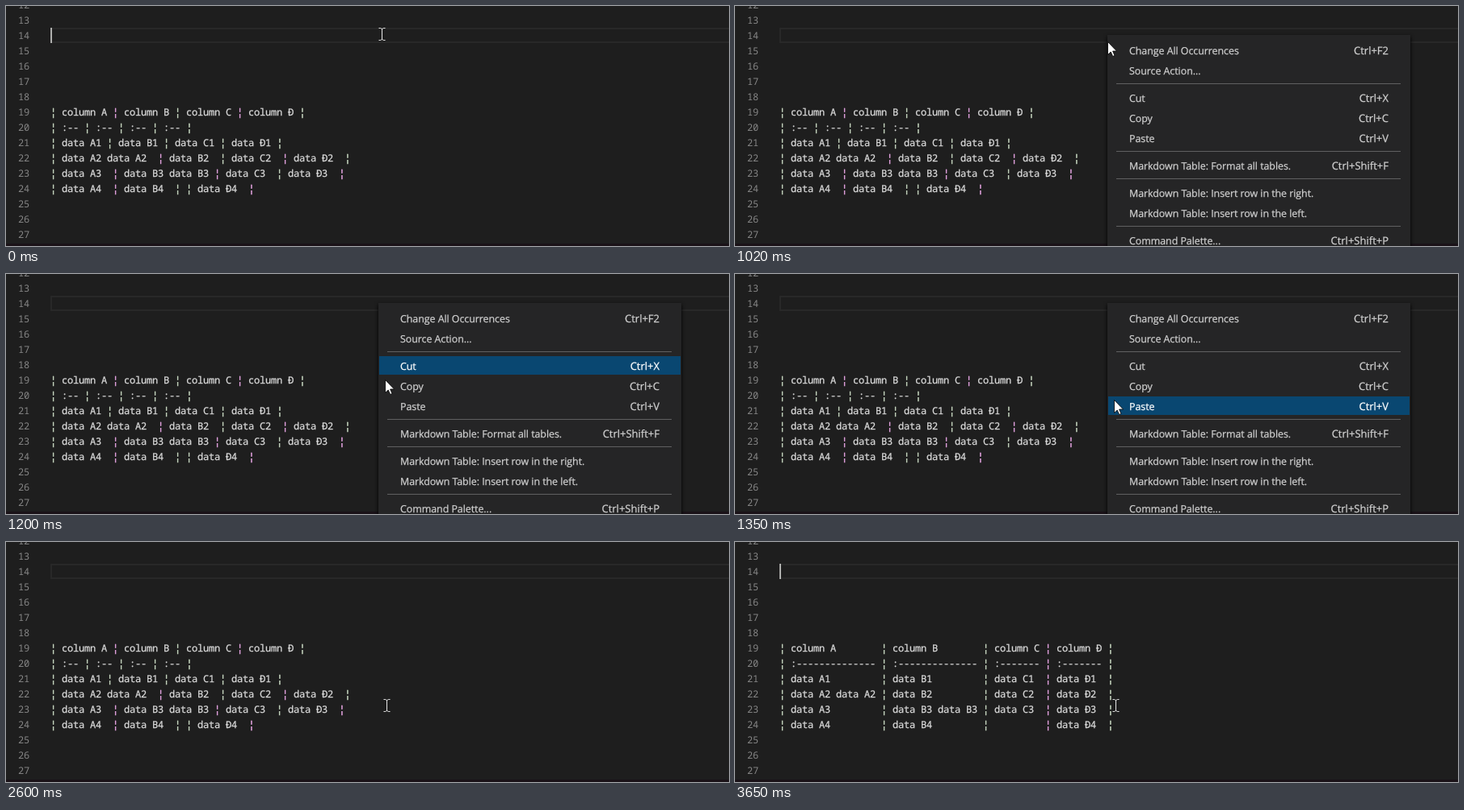
Write an HTML page that moves like this. It is 895 px wide and 298 px high and loops after 4.03 s.

```html
<!DOCTYPE html>
<html lang="en">
<head>
<meta charset="utf-8">
<title>Format tables from the context menu</title>
<style>
  html, body { margin: 0; width: 100%; height: 100%; overflow: hidden; background: #1e1e1e; }
  svg { display: block; width: 895px; height: 298px; }
  text { white-space: pre; text-rendering: geometricPrecision; stroke-width: .25px; }
  .code { font: 12px "Noto Sans Mono", monospace; letter-spacing: -.2px; fill: #dcdcdc; stroke: #dcdcdc; }
  .num { fill: #858585; stroke: none; }
  .even, .odd { stroke-width: .5px; }
  .even { fill: #cfe0c8; stroke: #cfe0c8; }
  .odd { fill: #eeaaea; stroke: #eeaaea; }
  #menu { filter: drop-shadow(0 2px 2.5px #000); }
  .item text { font: 12.4px "Open Sans", sans-serif; letter-spacing: -.03px; fill: #d0d0d0; stroke: #d0d0d0; }
  .item .key { font-size: 13px; letter-spacing: 0; text-anchor: end; }
  .item rect { fill: none; }
  .item.on rect { fill: #094771; }
  .item.on text { fill: #fff; stroke: #fff; }
</style>
</head>
<body>
<svg id="stage" viewBox="0 0 895 298">
  <rect width="895" height="298" fill="#1e1e1e"/>
  <path d="M897 28H56V45H897" fill="none" stroke="#282828" stroke-width="2"/>
  <g id="numbers"></g>
  <g id="messy"></g>
  <g id="tidy"></g>
  <rect id="caret" x="55" y="27" width="2" height="19" fill="#aeafad"/>
  <rect y="295" width="895" height="3" fill="#1a1218"/>
  <g id="menu"><rect x="461" y="36" width="375" height="290" fill="#252526"/></g>
  <path id="beam" d="M-3.5 -7.5H-1.5L.5 -6.5 2.5 -7.5H4.5M.5 -6.5V6.5M-3.5 7.5H-1.5L.5 6.5 2.5 7.5H4.5" fill="none" stroke="#e8e8e8"/>
  <path id="arrow" d="M.5 .5V16.5L4.2 13 6.7 18.5 9 17.5 6.6 12H11.5Z" fill="#fff" stroke="#000" stroke-width=".8"/>
</svg>
<script>
const LOOP = 4030;
const $ = id => document.getElementById(id);

function add(parent, tag, attrs, text) {
  const node = document.createElementNS('http://www.w3.org/2000/svg', tag);
  for (const key in attrs) node.setAttribute(key, attrs[key]);
  if (text) node.textContent = text;
  return parent.appendChild(node);
}

const baseline = line => 41 + (line - 14) * 19;

// Line numbers
for (let n = 12; n <= 27; n++)
  add($('numbers'), 'text', { x: 15, y: baseline(n), class: 'code num' }, String(n));

// Table, as typed and formatted
const rows = [
  '¦ column A ¦ column B ¦ column C ¦ column Đ ¦',
  '¦ :-- ¦ :-- ¦ :-- ¦ :-- ¦',
  '¦ data A1 ¦ data B1 ¦ data C1 ¦ data Đ1 ¦',
  '¦ data A2 data A2  ¦ data B2  ¦ data C2  ¦ data Đ2  ¦',
  '¦ data A3  ¦ data B3 data B3 ¦ data C3  ¦ data Đ3  ¦',
  '¦ data A4  ¦ data B4  ¦ ¦ data Đ4  ¦'
];

function format(lines) {
  const cells = lines.map(line => line.split('¦').slice(1, -1).map(cell => cell.trim()));
  const widths = cells[0].map((_, i) => Math.max(...cells.map(row => row[i].length)));
  return cells.map(row => '¦ ' + row.map((cell, i) =>
    cell.padEnd(widths[i], cell[0] === ':' ? '-' : ' ')).join(' ¦ ') + ' ¦');
}

function drawTable(parent, lines) {
  lines.forEach((line, i) => {
    const text = add(parent, 'text', { x: 55, y: baseline(19 + i), class: 'code' });
    let col = 0;
    for (const part of line.split(/(¦)/)) {
      if (!part) continue;
      const cls = part === '¦' ? (col % 2 ? 'odd' : 'even') : 'cell';
      add(text, 'tspan', { class: cls }, part);
      col += part.length;
    }
  });
}
drawTable($('messy'), rows);
drawTable($('tidy'), format(rows));

// Context menu: top edge, label, shortcut
const items = [
  [43, 'Change All Occurrences', 'Ctrl+F2'],
  [68, 'Source Action...'],
  [102, 'Cut', 'Ctrl+X'],
  [127, 'Copy', 'Ctrl+C'],
  [152, 'Paste', 'Ctrl+V'],
  [186, 'Markdown Table: Format all tables.', 'Ctrl+Shift+F'],
  [220, 'Markdown Table: Insert row in the right.'],
  [245, 'Markdown Table: Insert row in the left.'],
  [279, 'Command Palette...', 'Ctrl+Shift+P']
].map(([top, label, key]) => {
  const node = add($('menu'), 'g', { class: 'item' });
  add(node, 'rect', { x: 462, y: top, width: 373, height: 23 });
  add(node, 'text', { x: 488, y: top + 17 }, label);
  if (key) add(node, 'text', { x: 809, y: top + 17, class: 'key' }, key);
  return { top, node };
});
for (const y of [96.5, 180.5, 214.5, 273.5])
  add($('menu'), 'path', { d: `M472 ${y}H824`, stroke: '#606061' });

// Pointer stops: time, x, y
const stops = [
  [0, 465, 35], [460, 461, 33], [520, 455, 30], [580, 460, 35], [690, 461, 35],
  [1020, 461, 44], [1070, 463, 58], [1120, 466, 84], [1150, 468, 108],
  [1200, 469, 131], [1270, 469, 140], [1310, 469, 153], [1350, 469, 156],
  [1400, 469, 165], [1450, 469, 175], [1490, 469, 186], [1530, 469, 186],
  [1580, 469, 191], [1620, 469, 196], [1660, 469, 201], [2600, 471, 203]
];

const show = (id, on) => $(id).setAttribute('display', on ? 'inline' : 'none');
const between = (t, a, b) => t >= a && t < b;

function render(t) {
  const at = stops.findLastIndex(stop => t >= stop[0]);
  const [, x, y] = stops[at];
  const isArrow = between(t, 690, 2600);

  show('menu', between(t, 630, 2600));
  show('messy', t < 2680);
  show('tidy', t >= 2680);
  show('caret', t < 230 || between(t, 2640, 3160) || t >= 3650);
  show('arrow', isArrow);
  show('beam', !isArrow);
  $(isArrow ? 'arrow' : 'beam').setAttribute('transform', `translate(${x} ${y})`);

  // The highlight trails the pointer by one stop
  const hover = t >= 1070 ? stops[at - 1][2] : 0;
  for (const { top, node } of items)
    node.classList.toggle('on', between(hover, top, top + 25));
}

const start = performance.now();
function tick() {
  render((performance.now() - start) % LOOP);
  requestAnimationFrame(tick);
}
tick();
</script>
</body>
</html>
```
